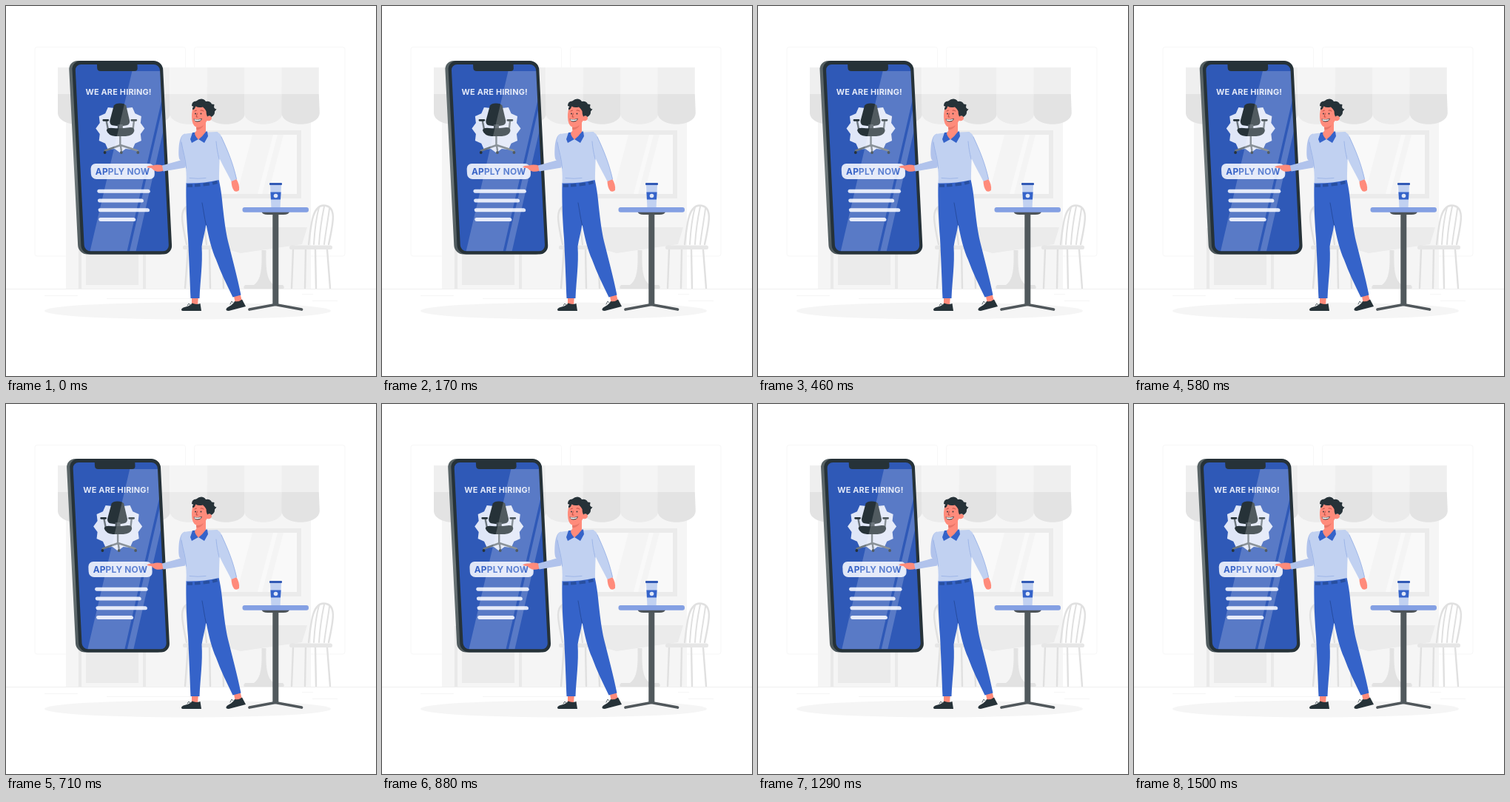
An HTML page that plays this animation: 500x500 px, repeating every 1.54 s.

```html
<!DOCTYPE html>
<html lang="en">
<head>
<meta charset="utf-8">
<title>We are hiring</title>
<style>
  html, body { margin: 0; width: 100%; height: 100%; overflow: hidden; background: #fff; }
  svg { display: block; width: 100vw; height: 100vh; }
  text { font-family: Inter, "Open Sans", sans-serif; font-weight: 700; text-anchor: middle; letter-spacing: .2px; }
  .line { fill: none; stroke-linecap: round; stroke-linejoin: round; }
  .dark { fill: #263238; }
  .skin { fill: #ff8b7b; }
  .blue { fill: #3563c9; }
  .pale { fill: #dfe6f7; }
</style>
</head>
<body>
<svg viewBox="0 0 500 500">
  <defs>
    <clipPath id="screen"><rect x="89" y="79" width="114.2" height="252.3" rx="8"/></clipPath>
    <linearGradient id="edge" x1="0" y1="0" x2="0" y2="1">
      <stop offset="0" stop-color="#566164"/>
      <stop offset=".55" stop-color="#6f797b"/>
      <stop offset="1" stop-color="#4d585c"/>
    </linearGradient>
    <g id="seat" class="line" stroke="#e0e0e0" stroke-width="2.4">
      <path d="M388 329L386 381M405 329L404 381M418 329L419 381M434 329L438 381"/>
      <path d="M409 322C412 300 413 270 429 269.500C447 270 443 290 436 322"/>
      <path d="M416 322C417 305 418 290 423 272M423 322C424 305 426 290 430 271M430 322C432 305 435 290 437 274" stroke-width="2"/>
      <rect x="383" y="323.500" width="58" height="5.500" rx="2.500" fill="#e6e6e6" stroke="none"/>
    </g>
  </defs>

  <!-- Street and café -->
  <g fill="none" stroke="#f7f7f7">
    <rect x="39" y="55.500" width="203.500" height="282.500" rx="3"/>
    <rect x="254.500" y="55.500" width="203.500" height="282.500" rx="3"/>
  </g>
  <path d="M0 382.500H500" stroke="#efefef"/>
  <path d="M52 391.500H97M136 395.500H250M400 389.500H415M414 398.500H448" stroke="#f5f5f5"/>
  <ellipse cx="245.500" cy="412" rx="193.500" ry="11.500" fill="#f5f5f5"/>
  <rect x="81" y="110" width="331" height="272" fill="#f5f5f5"/>
  <path d="M100 300V382M187 300V382" stroke="#e9e9e9" stroke-width="4"/>
  <rect x="108" y="200" width="71" height="177" fill="#ebebeb"/>
  <rect x="271" y="171" width="125" height="86" fill="#f9f9f9" stroke="#ebebeb" stroke-width="6"/>
  <path d="M333 174H361L340 254H312ZM367 174H375L354 254H346Z" fill="#f4f4f4"/>
  <g id="awning"></g>
  <path d="M285 299H407L400 322L317 334L285 325Z" fill="#ebebeb"/>
  <path d="M345.500 330H351.500C351 355 352 370 362 377H374Q377 380 375 382H322Q320 380 323 377H335C345 370 346 355 345.500 330Z" fill="#e2e2e2"/>
  <use href="#seat"/>
  <use href="#seat" transform="translate(680) scale(-1 1)"/>

  <!-- Phone -->
  <g id="phone">
    <g transform="matrix(1 0 .05 1 .7 0)">
      <rect x="80.500" y="74" width="122" height="261.500" rx="12" fill="url(#edge)"/>
      <rect x="84.700" y="74" width="122.700" height="261.500" rx="12" class="dark"/>
      <rect x="89" y="79" width="114.200" height="252.300" rx="8" fill="#2f59b7"/>
      <path d="M118.500 77H173V84Q173 88 168.500 88H123Q118.500 88 118.500 84Z" class="dark"/>
      <rect x="103" y="213" width="86" height="21" rx="7" class="pale"/>
      <g class="pale">
        <rect x="110.300" y="247.800" width="71.500" height="5" rx="2.500"/>
        <rect x="110.300" y="260.600" width="62" height="5" rx="2.500"/>
        <rect x="110.300" y="273.300" width="69.500" height="5" rx="2.500"/>
        <rect x="110.300" y="286" width="50" height="5" rx="2.500"/>
      </g>
    </g>
    <text x="152.300" y="120" font-size="10.900" fill="#e3e9f8">WE ARE HIRING!</text>
    <text x="157.800" y="227.800" font-size="11.900" fill="#3561c6">APPLY NOW</text>
    <polygon id="badge" class="pale"/>
    <g class="line" stroke="#6d777f" stroke-width="2.400">
      <path d="M154.500 174V189M155 188L134 195.500M155 188L178 195.500M155 188L156 195M136 156L138 166L142 168M173 156L172 165L168 168"/>
    </g>
    <path d="M146 134.500Q148 131.500 154 131.500Q160.500 131.500 162.500 134.500L167.300 155Q168 160 163 161.300Q155 163 144 161.300Q140 160 140.500 155Z" class="dark"/>
    <path d="M151 160H158V166H151Z" fill="#49545c"/>
    <path d="M136 168Q137 164 145 165Q155 166 168 164Q174 164 173.500 169Q172 175 162 176H148Q138 175 136 168Z" class="dark"/>
    <path d="M132 154.300H138M170 154.300H176" class="line" stroke="#263238" stroke-width="2.800"/>
    <g class="dark"><circle cx="133.800" cy="198" r="1.900"/><circle cx="156" cy="198" r="1.900"/><circle cx="178.500" cy="198" r="1.900"/></g>
    <!-- Glare lies over everything on the screen -->
    <g transform="matrix(1 0 .05 1 .7 0)" clip-path="url(#screen)">
      <path d="M165.500 88H214.500L146.500 331.300H96.500ZM220.500 79H228.500L158.500 331.300H150Z" fill="#fff" opacity=".2"/>
    </g>
  </g>

  <!-- Man -->
  <g>
    <path d="M251 392H260L259 404H251ZM307 388L316 387L319 399L310 402Z" class="skin"/>
    <path d="M262.500 402L264 412H239Q236 411.500 237.500 409Q239 407 243 406.500Q249 405 251.500 401.500Q257 404 262.500 402Z" class="dark"/>
    <path d="M319 396.500L324 406L301 412Q297 412 297.500 409.500Q298 407.500 301.500 406Q307 403 309 399Q315 400 319 396.500Z" class="dark"/>
    <path d="M245 405L247 402L249 404M303 403L305 399L307 401" class="line" stroke="#5a666c" stroke-width="1"/>
    <path d="M243.500 239L287.500 234.500C291 250 292 261 293 272C295 290 297 305 300 318C306 342 313 368 317.500 390.500L306.500 393.500C298 376 290 360 284 343C278 330 274 313 270.500 295C269 305 266 315 264.500 325C266 350 262.500 370 261.500 395H249.500C248 355 247 335 246 314C244 290 243 262 243.500 239Z" class="blue"/>
    <path d="M270.500 296C268 286 267 276 265 266" class="line" stroke="#264c9f" stroke-width="1"/>
    <path d="M245 242.700H252M255 242.600L262.500 242M266.500 241.500L275 240.500M279 239.700L285.500 238" stroke="#284f9f" stroke-width="4"/>

    <path d="M304.500 236L311 233.500Q316 241 315 249Q312 252 308.500 250Q304.500 245 304.500 236Z" class="skin"/>
    <path d="M282 170.500Q288 169 291.500 177C300 196 307 213 312 234L304.500 237C297 222 287 206 283 190Z" fill="#c1d1f1"/>
    <path d="M213 216Q205 213.500 199 215.500Q193 215 190 217.500Q193 219 196.500 219Q199 222 203 223.500Q208 224.500 213 222.500Z" class="skin"/>
    <path d="M242 172.500C234 174 233 190 233.500 203Q234 208 236 208.500L211 215.500L212.500 223.500L242 218.500L247 202Z" fill="#b1c3ec"/>
    <path d="M241 173C252 171 272 171 286 170C291 184 288 210 288 235Q266 240 243.500 239.500C245 220 240 200 237 185Q236 175 241 173Z" fill="#c1d1f1"/>
    <path d="M237 184C239 196 243 207 243.500 219M291 177C300 196 307 213 311.500 234M284 183C285 195 287 202 288 207M248 232.500Q260 234 270 232.500" class="line" stroke="#8fa9e2" stroke-width=".7"/>

    <path d="M252 171L272 169.500L273 176L268 185L260 180L251 185L249 180Z" class="blue"/>
    <path d="M257 160L270 154L270 170Q265 177 260 180.500Q255.500 176 255 172L257.500 168Z" class="skin"/>
    <path d="M257 164Q263 164 268 159Q265 167 257.500 167.500Z" fill="#e87668"/>
    <path d="M253 136Q250 146 251.500 155Q253 164 260 164Q268 163 271.500 155Q278 156 278 151Q277 147 273.500 149L273 134Z" class="skin"/>
    <path d="M251 135Q251 128.500 257 128.500Q262 124.500 266.500 126Q269 127 270 129Q276 128 278 132.500L281.500 133L281 137Q282 139 284.500 139.500L282 142.500Q282.500 147 277.500 150Q276 147 272 149.500Q270.500 146 270.500 142Q268.500 138.500 266 136.500Q260 138 256.500 135.500Q255.500 139 252.500 140.500Q251 138 253.500 136Z" class="dark"/>
    <path d="M255 142L257.500 141M263 141Q265 140 267 142M258.500 145L257 150H259" class="line" stroke="#b4483f" stroke-width=".9"/>
    <g class="dark"><circle cx="256" cy="145.500" r=".9"/><circle cx="263.500" cy="145.500" r=".9"/></g>
    <path d="M253.500 152.500Q259 154 265 152Q263.500 156.500 258 156.500Q254.500 156 253.500 152.500Z" class="dark"/>
    <path d="M254.300 153Q259 154.300 264 152.700L262.500 154.800Q258 156 255.200 155Z" fill="#fff"/>
  </g>

  <!-- Table and cup -->
  <path d="M329 410L364 403.500L399.500 410" class="line" stroke="#50575b" stroke-width="3.800"/>
  <path d="M360.300 279H368.300V404.500H360.300Z" fill="#51595d"/>
  <path d="M345.500 278H383Q382 281.800 375 282H353.500Q346.500 281.800 345.500 278Z" fill="#4c5358"/>
  <rect x="319.500" y="272" width="89.500" height="6.800" rx="3" fill="#84a0e3"/>
  <path d="M357 242H372L370.600 272H358.400Z" fill="#c1d1f1"/>
  <rect x="356" y="239" width="17" height="3" rx="1" fill="#3159b5"/>
  <path d="M357.400 251.500H371.600L371 261.500H358Z" class="blue"/>
  <circle cx="364.500" cy="256.500" r="2.800" fill="#dfe6f7"/>
</svg>

<script>
  const $ = id => document.getElementById(id);

  const stripe = (x, w, top, flap) =>
    `<path d="M${x} 83H${x + w}V119H${x}Z" fill="${top}"/>` +
    `<path d="M${x} 119H${x + w}L${x + w + 1} 144C${x + w + 1} 165 ${x} 165 ${x} 144Z" fill="${flap}"/>`;
  let awning = '';
  for (let i = 0; i < 7; i++) {
    awning += stripe(70 + i * 50.4, 50.4, ...(i % 2 ? ['#f5f5f5', '#ebebeb'] : ['#efefef', '#e3e3e3']));
  }
  $('awning').innerHTML = awning;

  const POINTS = 12;
  $('badge').setAttribute('points', Array.from({ length: POINTS * 2 }, (_, i) => {
    const r = i % 2 ? 28.5 : 33, a = i * Math.PI / POINTS;
    return `${154.5 + r * Math.cos(a)},${165.5 + r * Math.sin(a)}`;
  }).join(' '));

  const LOOP = 1540, FRAMES = 37, FPS = 24, SHAKE = 1500, LEAD = 30;
  const stops = [0, -1, 2, -4, 4, -4, 4, -4, 2, -1, 0];
  const frameStart = k => Math.round(k * 100 / FPS) * 10;

  function shake(ms) {
    const p = Math.min(ms / SHAKE, 1) * 10, i = Math.min(Math.floor(p), 9);
    return stops[i] + (stops[i + 1] - stops[i]) * (p - i);
  }

  // The shake is sampled at 24 frames per second
  function draw(now) {
    const t = now % LOOP;
    let k = FRAMES - 1;
    while (k > 0 && frameStart(k) > t) k--;
    $('phone').setAttribute('transform', `translate(${shake(k * 1000 / FPS + LEAD).toFixed(2)})`);
  }

  let start;
  function tick(now) {
    start ??= now;
    draw(now - start);
    requestAnimationFrame(tick);
  }
  draw(0);
  requestAnimationFrame(tick);
</script>
</body>
</html>
```
